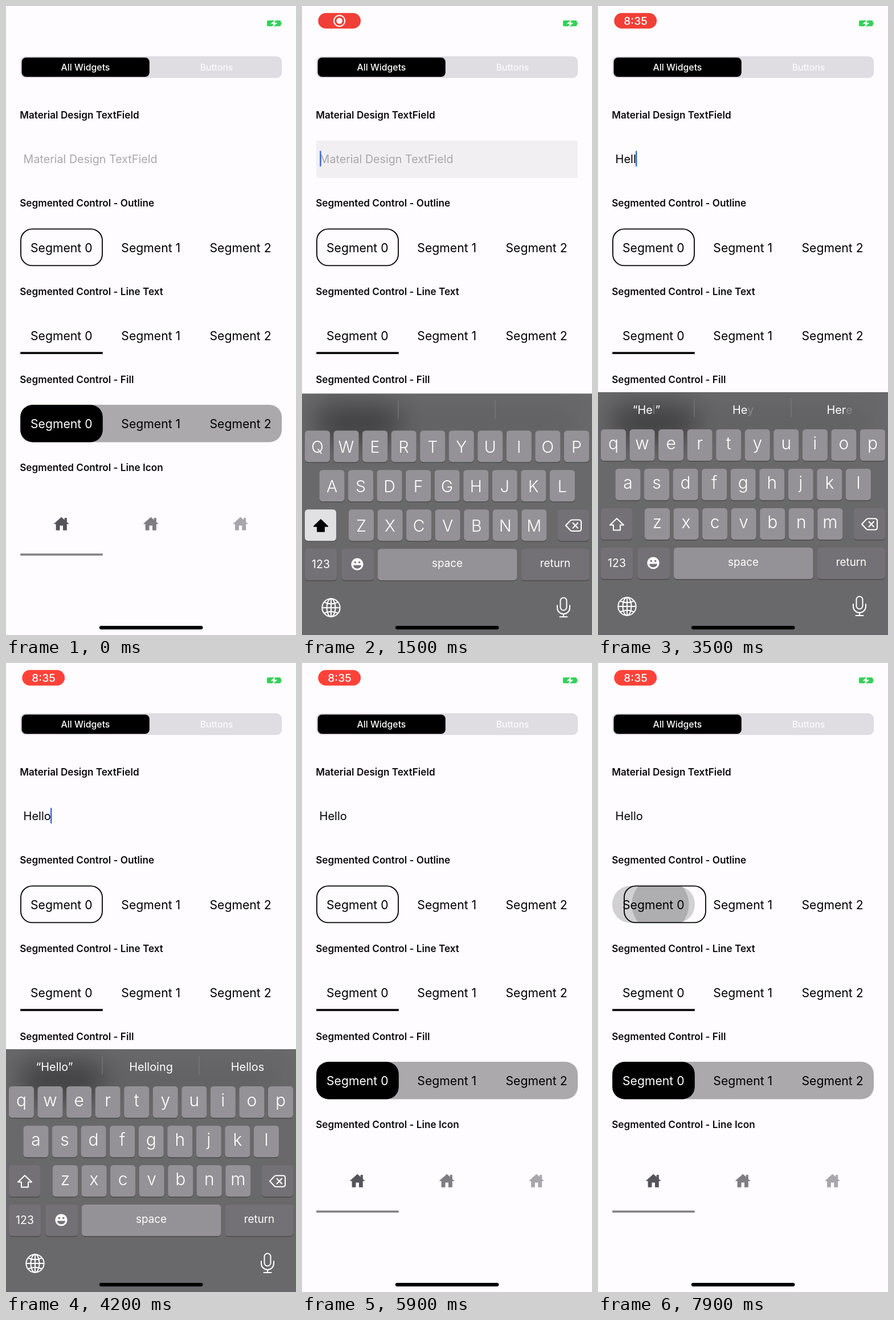
Write an HTML page that moves like this. It is 509x1101 px and loops after 8 s.

```html
<!DOCTYPE html>
<html lang="en">
<head>
<meta charset="utf-8">
<title>Widgets demo</title>
<style>
  html, body { margin: 0; width: 100%; height: 100%; overflow: hidden; background: #fefcff; }
  svg { display: block; width: 509px; height: 1101px; font-family: Inter, "Open Sans", sans-serif; }
</style>
</head>
<body>
<svg id="stage" viewBox="0 0 509 1101"></svg>
<script>
const LOOP = 8000, STEP = 100;
const KEYS_UP = 676, KEYS_DOWN = 1101;
const WHITE = '#fff', KEY = '#949296', SIDE_KEY = '#737175';

const rect = (x, y, w, h, r, fill, extra = '') =>
  `<rect x="${x}" y="${y}" width="${w}" height="${h}" rx="${r}" fill="${fill}" ${extra}/>`;
const text = (str, x, y, size, fill, extra = '') =>
  `<text x="${x}" y="${y}" font-size="${size}" fill="${fill}" ${extra}>${str}</text>`;
const mid = (str, x, y, size, fill, extra = '') =>
  text(str, x, y, size, fill, `text-anchor="middle" ${extra}`);
const line = (d, width = 2, extra = '') =>
  `<path d="${d}" fill="none" stroke="#fff" stroke-width="${width}" stroke-linecap="round" stroke-linejoin="round" ${extra}/>`;

const segmentX = [97.3, 254.3, 411.6];
const segments = (y, firstFill = '#000') => segmentX
  .map((x, i) => mid('Segment ' + i, x, y, 21.2, i ? '#000' : firstFill)).join('');

const headings = ['Material Design TextField', 'Segmented Control - Outline',
  'Segmented Control - Line Text', 'Segmented Control - Fill', 'Segmented Control - Line Icon']
  .map((s, i) => text(s, 24.2, 197.2 + i * 154.2, 17.15, '#0b0a0c', 'font-weight="600"')).join('');

const houses = ['#55545a', '#7f7d82', '#a8a6ab'].map((c, i) =>
  `<path transform="translate(${segmentX[i] - 16.5} 890.4) scale(1.37)" fill="${c}"
    d="M19 9.3V4h-3v2.6L12 3 2 12h3v8h5v-6h4v6h5v-8h3z"/>`).join('');

function key(x, y, w, fill) {
  return rect(x, y + 1.5, w, 55, 5.5, '#4d4c4f') + rect(x, y, w, 55, 5.5, fill);
}

const rows = [['qwertyuiop', 5, 65], ['asdfghjkl', 30.5, 134], ['zxcvbnm', 82, 203]];
const eachKey = draw => rows.map(([letters, x, y]) =>
  [...letters].map((c, i) => draw(c, x + i * 50.55, y)).join('')).join('');

const caps = eachKey((c, x, y) => key(x, y, 44, KEY));
const lower = eachKey((c, x, y) => mid(c, x + 22, y + 35, 30, WHITE, 'font-weight="300"'));
const upper = eachKey((c, x, y) => mid(c.toUpperCase(), x + 22, y + 38.5, 28.5, WHITE, 'font-weight="300"'));
const arrow = 'M33 221 45 232.5H39V241.5H27V232.5H21Z';

const icons =
  // delete
  line('M463 231 471 222.5Q472 221.3 474 221.3H486Q490 221.3 490 225V237Q490 240.7 486 240.7H474Q472 240.7 471 239.5Z') +
  line('M475.5 226.5 484 235.5M484 226.5 475.5 235.5') +
  // emoji
  `<circle cx="97" cy="299" r="10.6" fill="#fff"/>
   <circle cx="93.3" cy="295.5" r="1.7" fill="${SIDE_KEY}"/><circle cx="100.7" cy="295.5" r="1.7" fill="${SIDE_KEY}"/>
   <path d="M90 300.5H104A7 6 0 0 1 90 300.5Z" fill="${SIDE_KEY}"/>` +
  // globe
  `<g fill="none" stroke="#fff" stroke-width="2"><circle cx="51" cy="375" r="15.7"/>
   <ellipse cx="51" cy="375" rx="7.5" ry="15.7"/>
   <path d="M51 359V391M35 375H67M39 365.5Q51 371 63 365.5M39 384.5Q51 379 63 384.5"/></g>` +
  // microphone
  `<rect x="453.5" y="357.5" width="11" height="22" rx="5.5" fill="none" stroke="#fff" stroke-width="2"/>` +
  line('M448 371V375A11 11 0 0 0 470 375V371M459 386V391M452.5 391H465.5');

const keyboard = `
  <clipPath id="pane"><rect width="509" height="430"/></clipPath>
  <g id="keyboard"><g clip-path="url(#pane)">
    ${rect(0, 0, 509, 430, 0, '#69686b')}
    <g id="behind" filter="url(#blur)">
      ${rect(25, 698, 145, 64, 20, '#000', 'opacity=".4"')}
      ${rect(170, 700, 314, 58, 20, '#000', 'opacity=".07"')}
    </g>
    ${rect(168.5, 12, 1, 32, 0, '#7f7e81')}${rect(338.5, 12, 1, 32, 0, '#7f7e81')}
    <g id="hints"></g>
    ${caps}
    ${key(5, 203, 55, SIDE_KEY)}${key(449, 203, 55, SIDE_KEY)}
    ${key(5, 272, 56.5, SIDE_KEY)}${key(69.5, 272, 56.5, SIDE_KEY)}
    ${key(133, 272, 244.5, KEY)}${key(385, 272, 119, SIDE_KEY)}
    ${mid('123', 33, 306, 19.5, WHITE)}${mid('space', 255, 304, 18.8, WHITE)}${mid('return', 444.5, 304, 18.8, WHITE)}
    <g id="lower">${lower}${line(arrow)}</g>
    <g id="upper">${upper}${rect(5, 203, 55, 55, 5.5, '#e1e0e3')}<path d="${arrow}" stroke="#000" stroke-width="2" stroke-linejoin="round"/></g>
    ${icons}
  </g></g>`;

document.getElementById('stage').innerHTML = `
  <defs>
    <filter id="blur" filterUnits="userSpaceOnUse" x="-80" y="580" width="680" height="300"><feGaussianBlur stdDeviation="24"/></filter>
    <clipPath id="fieldBox"><rect x="25" y="235.5" width="459" height="65.5"/></clipPath>
    <clipPath id="segmentBox"><rect x="25" y="390" width="145" height="65" rx="32"/></clipPath>
  </defs>
  ${rect(0, 0, 509, 1101, 0, '#fefcff')}
  <g id="pill">
    ${rect(28.3, 12.2, 74.8, 27.4, 13.7, '#ff4239', 'id="pillBody"')}
    <g id="dot"><circle cx="65.7" cy="26" r="9.6" fill="none" stroke="#fff" stroke-width="2"/><circle cx="65.7" cy="26" r="5.2" fill="#fff"/></g>
    ${mid('8:35', 66, 33, 19.2, WHITE, 'id="clock" font-weight="500"')}
  </g>
  ${rect(458, 25.3, 24.5, 10.2, 2.2, '#34d05a')}${rect(482.3, 28.3, 1.5, 4.2, .7, '#34d05a')}
  <path d="M473 24 464.5 31.3H469.5L467.5 37 476.5 29.6H471.3Z" fill="#fefcff"/>
  ${rect(25.2, 88, 458.8, 38, 9, '#dfdde2')}${rect(27.6, 90.3, 224.2, 33.6, 7.5, '#000')}
  ${mid('All Widgets', 139.5, 112.5, 15.8, WHITE, 'font-weight="500"')}
  ${mid('Buttons', 369.5, 112.5, 15.7, '#fbf9fe', 'font-weight="500"')}
  ${headings}
  <g id="fieldRipple" clip-path="url(#fieldBox)">
    ${rect(25, 235.5, 459, 65.5, 0, '#000', 'opacity=".095"')}
    <circle id="fieldWave" cx="258" cy="265" opacity=".075"/>
  </g>
  ${text('Material Design TextField', 30.6, 274.7, 19.7, '#a9a7ab', 'id="hintText"')}
  ${text('', 30.6, 274.7, 20, '#000', 'id="typed"')}
  ${rect(0, 253.5, 2.4, 27.5, 1, '#3e68d8', 'id="caret"')}
  <g id="segmentRipple" clip-path="url(#segmentBox)">
    ${rect(25, 390, 145, 65, 0, '#000', 'opacity=".175"')}
    <circle id="segmentWave" cx="109.5" cy="422.5" opacity=".17"/>
  </g>
  ${rect(26, 390.4, 143, 64, 20, 'none', 'id="outline" stroke="#000" stroke-width="1.8"')}
  ${segments(431)}
  ${segments(585)}${rect(25.2, 605.6, 144.6, 3.6, 0, '#000')}
  ${rect(25.2, 698, 458.8, 65.5, 21.5, '#aba9ac')}${rect(25.2, 698, 144.6, 65.5, 21.5, '#000')}
  ${segments(739.3, WHITE)}
  ${houses}${rect(25.2, 958.4, 144.6, 3.6, 0, '#838186')}
  ${keyboard}
  ${rect(163.8, 1085, 181.7, 6.2, 3.1, '#000')}`;

const el = id => document.getElementById(id);
const set = (id, attrs) => { for (const k in attrs) el(id).setAttribute(k, attrs[k]); };
const ramp = (t, from, to) => Math.min(1, Math.max(0, (t - from) / (to - from)));
const latest = (table, t) => table.filter(row => row[0] <= t).pop();

// critically damped spring
const spring = ms => {
  const x = Math.max(0, ms) * 0.01826;
  return 1 - (1 + x) * Math.exp(-x);
};

const typing = [[0, ''], [2200, 'H'], [2900, 'He'], [3200, 'Hel'], [3400, 'Hell'], [3800, 'Hello']];
// "~" marks a letter that is still faint
const hints = [
  [0, '', '', ''], [2700, '“H”', 'Hi', 'Hey'], [3100, '“He”', 'He', 'Her'],
  [3500, '“He~l”', 'He~y', 'Her~e'], [3600, '“Hell”', 'Hello', 'Hells'],
  [4000, '“Hello”', 'Helloing', 'Hellos']
];
const hintX = [85, 254.5, 424];

function pulse(t) {
  const wave = Math.cos(2 * Math.PI * (t - 5980) / 2000);
  const k = Math.min(1, Math.max(0, 0.55 + 0.75 * wave));
  return `rgb(${220 + 35 * k},${58 + 8 * k},${53 + 4 * k})`;
}

function caretOn(t) {
  if (t < 1200 || t >= 4800) return false;
  if (t < 2200) return (t - 1200) % 1000 < 600;
  return t < 4300 || t >= 4600;
}

function draw(t) {
  set('pill', { opacity: ramp(t, 400, 600) });
  set('pillBody', { fill: pulse(t) });
  set('dot', { opacity: 1 - ramp(t, 2900, 3100) });
  set('clock', { opacity: ramp(t, 2900, 3100) });

  const word = latest(typing, t)[1];
  el('typed').textContent = word;
  set('hintText', { opacity: word ? 0 : 1 });
  const width = word ? el('typed').getComputedTextLength() : 0;
  set('caret', { x: word ? 29.8 + width : 31.2, opacity: caretOn(t) ? 1 : 0 });

  set('fieldRipple', { opacity: ramp(t, 1050, 1150) * (1 - ramp(t, 1300, 1600)) });
  set('fieldWave', { r: 60 + 174 * ramp(t, 1050, 1350) });

  const y = KEYS_UP + (KEYS_DOWN - KEYS_UP) * (1 - spring(t - 1095.3) + spring(t - 4753.5));
  set('keyboard', { transform: `translate(0 ${y})`, visibility: y < KEYS_DOWN - .5 ? 'visible' : 'hidden' });
  set('behind', { transform: `translate(0 ${-y})` });
  set('upper', { opacity: word ? 0 : 1 });
  set('lower', { opacity: word ? 1 : 0 });
  el('hints').innerHTML = latest(hints, t).slice(1).map((s, i) =>
    mid(s.replace(/~(.)/, '<tspan fill-opacity=".25">$1</tspan>'), hintX[i], 38, 19.9, WHITE)).join('');

  set('segmentRipple', { opacity: ramp(t, 7750, 7850) });
  set('segmentWave', { r: 27 + 23 * ramp(t, 7750, 7900) });
  set('outline', { transform: `translate(${20 * ramp(t, 7850, 7900)} 0)` });
}

const start = performance.now();
function tick(now) {
  const t = Math.max(0, now - start) % LOOP;
  draw(Math.floor(t / STEP) * STEP);
  requestAnimationFrame(tick);
}
draw(0);
requestAnimationFrame(tick);
</script>
</body>
</html>
```
